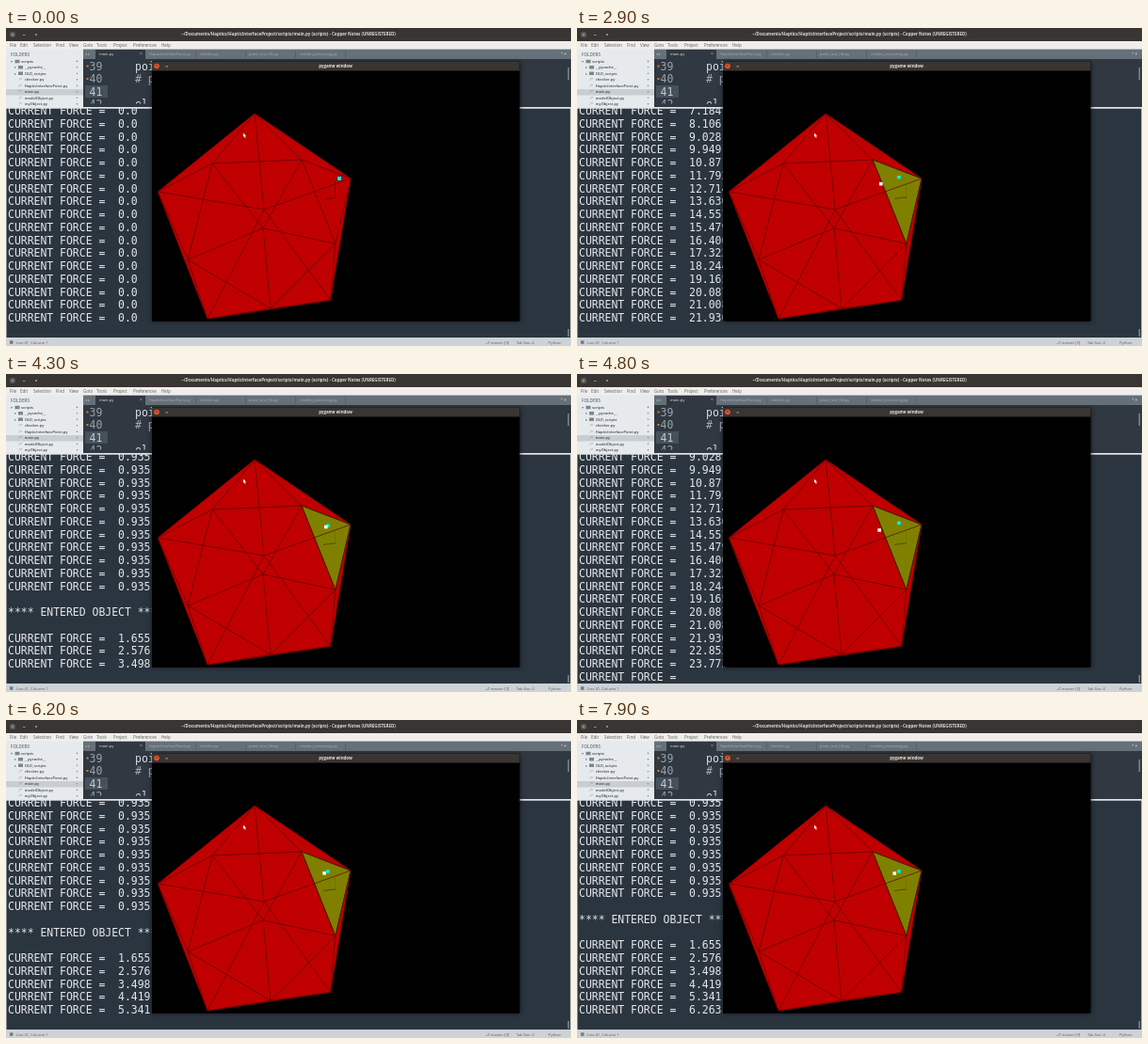
These frames come from a looping animation (600 px wide and 338 px high, 8 s). An HTML page with a canvas:

```html
<!DOCTYPE html>
<html lang="en">
<head>
<meta charset="utf-8">
<title>Haptic probe</title>
<style>
html, body { margin: 0; width: 100%; height: 100%; overflow: hidden; background: #000; }
canvas { display: block; }
</style>
</head>
<body>
<canvas id="stage" width="600" height="338"></canvas>
<script>
const ctx = document.getElementById('stage').getContext('2d');
const SANS = '"Open Sans", "Noto Sans", sans-serif';
const MONO = '11.45px "DejaVu Sans Mono", monospace';
const LOOP = 8000, FRAME = 100, VISIBLE = 17, PITCH = 13.75;

// Terminal log: every row also carries the probe state at that moment.
const log = [];
const add = (text, x, force = null) => log.push({ text, x, force });
const addForce = (value, x, force) => add('CURRENT FORCE =  ' + value, x, force);
const surface = 343;
const addDepth = k => {
  const f = 0.73305 + 0.92161 * k;
  addForce(f.toFixed(3), surface - f * 0.92, f);
};
const banner = (word, force) => ['', `**** ${word} OBJECT ****`, '']
  .forEach(s => add(s, surface, force));

function press(peak) {
  banner('ENTERED', 0.733);
  for (let k = 1; k <= peak; k++) addDepth(k);
  for (let k = peak; k >= 0; k--) addDepth(k);
  addForce('0.0', surface);
  banner('EXITED', null);
}
function hover(rows) {
  for (let i = 0; i < rows; i++) addForce('0.935', surface + Math.min(i, rows - i));
}
for (let i = 0; i < 127; i++) addForce('0.0', Math.min(354, surface + 127 - i));
press(24); hover(28);
press(27); hover(24);
press(24); hover(22);
press(24);

// [ms, rows printed]
const pace = [[0, 17.1], [3600, 186.1], [4800, 239.9], [6200, 305.1], [6900, 337.1], [7900, 384.1], [8000, 389]];
function printed(t) {
  const i = pace.findIndex(p => p[0] > t);
  const [t0, n0] = pace[i - 1], [t1, n1] = pace[i];
  return n0 + (n1 - n0) * (t - t0) / (t1 - t0);
}

function box(color, x, y, w, h) {
  ctx.fillStyle = color;
  ctx.fillRect(x, y, w, h);
}
function dot(color, x, y, r) {
  ctx.fillStyle = color;
  ctx.beginPath();
  ctx.arc(x, y, r, 0, 7);
  ctx.fill();
}
function write(text, x, y, color, font, align = 'left') {
  ctx.font = font;
  ctx.textAlign = align;
  ctx.fillStyle = color;
  ctx.fillText(text, x, y);
}
const small = (text, x, y, color, size = 4.1, weight = 400) =>
  write(text, x, y, color, `${weight} ${size}px ${SANS}`);
function path(points, close) {
  ctx.beginPath();
  points.forEach(p => ctx.lineTo(...p));
  if (close) ctx.closePath();
}
function line(points, color, width) {
  path(points);
  ctx.strokeStyle = color;
  ctx.lineWidth = width;
  ctx.stroke();
}

function drawTerminal(count) {
  box('#2b353f', 0, 84, 600, 246);
  const n = Math.floor(count);
  for (let i = 0; i < VISIBLE; i++)
    write(log[n - VISIBLE + i].text, 2, 92.1 + i * PITCH, '#e3e6e9', MONO);
  if (count - n > 0.8)
    write(log[n].text.slice(0, 15), 2, 92.1 + VISIBLE * PITCH, '#e3e6e9', MONO);
  box('#a4abb1', 0, 85, 0.7, 244);
  box('#a4abb1', 599, 85, 1, 244);
  box('#7b858e', 596.5, 320, 1.5, 8);
}

function drawEditor() {
  box('#303841', 82, 33, 518, 51);
  box('#46515c', 84, 61, 24, 13);
  box('#d0803a', 85.5, 39.5, 2, 2);
  box('#d0803a', 85.5, 53, 2, 2);
  box('#7b858e', 596.5, 42, 1.5, 13);
  ['39', '40', '41'].forEach((s, i) =>
    write(s, 88.5, 44.5 + i * 13.6, i === 2 ? '#c3cad0' : '#9aa3ab', MONO));
  write('points', 137, 44.5, '#d8dee9', MONO);
  write('# point', 137, 58.1, '#a6acb9', MONO);
  ctx.save();
  ctx.beginPath();
  ctx.rect(82, 74, 518, 6.5);
  ctx.clip();
  write('42', 88.5, 85, '#9aa3ab', MONO);
  write('el', 137, 85, '#d8dee9', MONO);
  ctx.restore();

  box('#667079', 82, 22, 518, 11);
  box('#303841', 95, 23, 53, 10);
  small('◂ ▸', 84, 29, '#aab2b9', 4);
  small('main.py', 99, 29.3, '#e4e7ea');
  small('×', 142, 29.3, '#aab2b9', 5);
  [['HapticInterfacePoint.py', 152], ['checker.py', 206], ['point_test_file.py', 258], ['render_processing.py', 312]]
    .forEach(([s, x]) => small(s, x, 29.3, '#a9b0b6', 4));
  [201, 254, 307, 360].forEach(x => box('#4f5962', x, 24, 0.7, 8));
  small('+ ▾', 589, 29.3, '#c0c6cb', 4.5);

  box('#e7eaed', 0, 22, 82, 62);
  box('#c9ced3', 0, 65, 82, 6.5);
  small('FOLDERS', 5, 30, '#68727a', 4.6, 600);
  small('▾', 5, 37, '#777', 4);
  box('#7d878f', 9.5, 33.8, 5, 3.5);
  small('scripts', 16, 37.2, '#3f474e', 4.1, 600);
  dot('#7d8a95', 75.5, 35.4, 0.8);
  ['__pycache__', 'OLD_scripts', 'checker.py', 'HapticInterfacePoint.py', 'main.py', 'modelObject.py', 'myObject.py']
    .forEach((s, i) => {
      const y = 43.3 + i * 6.5;
      if (i < 2) {
        small('▸', 9, y, '#777', 4);
        box('#7d878f', 13, y - 3.3, 5, 3.5);
      } else small('/*', 13.5, y, '#7d878f', 3.8);
      small(s, 19.7, y, '#3f474e', 4, 600);
      dot('#7d8a95', 75.5, y - 1.6, 0.8);
    });
}

function drawFrame() {
  box('#383532', 0, 0, 600, 14);
  dot('#5b5753', 7, 7, 3.2);
  small('×', 5.5, 8.6, '#ddd', 5);
  box('#aaa', 18, 7, 2.5, 0.8);
  box('#8a8682', 31, 6, 2, 2);
  write('~/Documents/Haptics/HapticInterfaceProject/scripts/main.py (scripts) - Copper Notes (UNREGISTERED)',
    300, 8.4, '#dfdbd6', `700 4.47px ${SANS}`, 'center');
  box('#efeeed', 0, 14, 600, 8.6);
  [['File', 4], ['Edit', 15], ['Selection', 29], ['Find', 53], ['View', 67], ['Goto', 82], ['Tools', 96],
    ['Project', 114], ['Preferences', 135], ['Help', 165]].forEach(([s, x]) => small(s, x, 20, '#5c5c5c', 4.5));
  box('#e4e7ea', 0, 84, 600, 1.7);
  box('#cdd2d6', 0, 329, 600, 9);
  box('#737c84', 4, 332.3, 3.5, 3.5);
  small('Line 41, Column 1', 10.5, 335.8, '#59626a');
  small('⎇ master [3]', 509, 335.8, '#59626a');
  small('Tab Size: 4', 542, 335.8, '#59626a', 3.9);
  small('Python', 576, 335.8, '#59626a');
}

// Projected icosahedron: outer ring, inner ring and the two poles.
const outer = [[264, 91], [366, 160], [344.5, 289.3], [214, 309], [161.3, 174]];
const inner = [[314, 140], [349.8, 229.3], [281, 298.2], [193, 246.3], [219, 144]];
const poles = [[274, 193], [273, 212.8]];

function drawSolid(touched) {
  path(outer, true);
  ctx.fillStyle = '#c00000';
  ctx.fill();
  if (touched) {
    path([inner[0], outer[1], inner[1]], true);
    ctx.fillStyle = '#808000';
    ctx.fill();
  }
  const edge = '#520000';
  outer.forEach((p, i) => {
    const q = inner[i], next = (i + 1) % 5;
    line([p, q, outer[next]], edge, 0.65);
    line([p, poles[0]], edge, 0.65);
    line([q, poles[1]], edge, 0.65);
    line([q, inner[next]], edge, 0.7);
    line([p, outer[next]], '#8a0000', 0.9);
  });
  if (touched) {
    line([inner[0], outer[1], inner[1], inner[0]], '#302800', 0.7);
    line([[349.5, 166], [349.5, 180]], '#6c6c00', 0.6);
    line([[337, 181.5], [345, 180.3], [350, 180]], '#3c3800', 0.7);
  } else {
    line([[349.5, 163], [349.5, 180.5]], '#5c1414', 0.8);
    line([[339, 181.5], [348, 180.5]], '#480000', 0.8);
  }
}

function drawProbe({ x, force }) {
  if (force === null) {
    const y = 161.5 - (x - 345) * 0.17;
    box('#163838', x - 2.8, y - 2.6, 5.6, 5.2);
    box('#20e0e0', x - 2, y - 2, 4, 4);
    return;
  }
  box('#00f0dc', 340, 160 - force * 0.14, 3.8, 3.4);
  box('#fff', x - 1.8, 160.2 + force * 0.17, 3.6, 3.5);
}

function drawWindow(state) {
  ctx.save();
  ctx.shadowColor = 'rgba(0,0,0,.6)';
  ctx.shadowBlur = 5;
  box('#000', 155, 35.5, 390.5, 276.3);
  ctx.restore();
  box('#393532', 155, 35.5, 390.5, 10);
  dot('#e2572b', 160, 40.5, 2.8);
  small('×', 158.7, 42, '#4a1c0c', 4.5);
  box('#bbb', 169.5, 40.5, 2.5, 0.8);
  write('pygame window', 350, 42, '#e8e5e1', `700 4.4px ${SANS}`, 'center');
  drawSolid(state.force !== null);
  drawProbe(state);
  path([[252, 111.7], [252, 115.8], [253, 115], [253.9, 117], [254.6, 116.6], [253.9, 114.8], [255, 114.6]], true);
  ctx.fillStyle = '#fff';
  ctx.fill();
}

function draw(now) {
  const t = Math.floor(now % LOOP / FRAME) * FRAME;
  const count = printed(t);
  drawTerminal(count);
  drawEditor();
  drawFrame();
  drawWindow(log[Math.floor(count) - 1]);
}

const start = performance.now();
function tick() {
  draw(performance.now() - start);
  requestAnimationFrame(tick);
}
tick();
</script>
</body>
</html>
```
